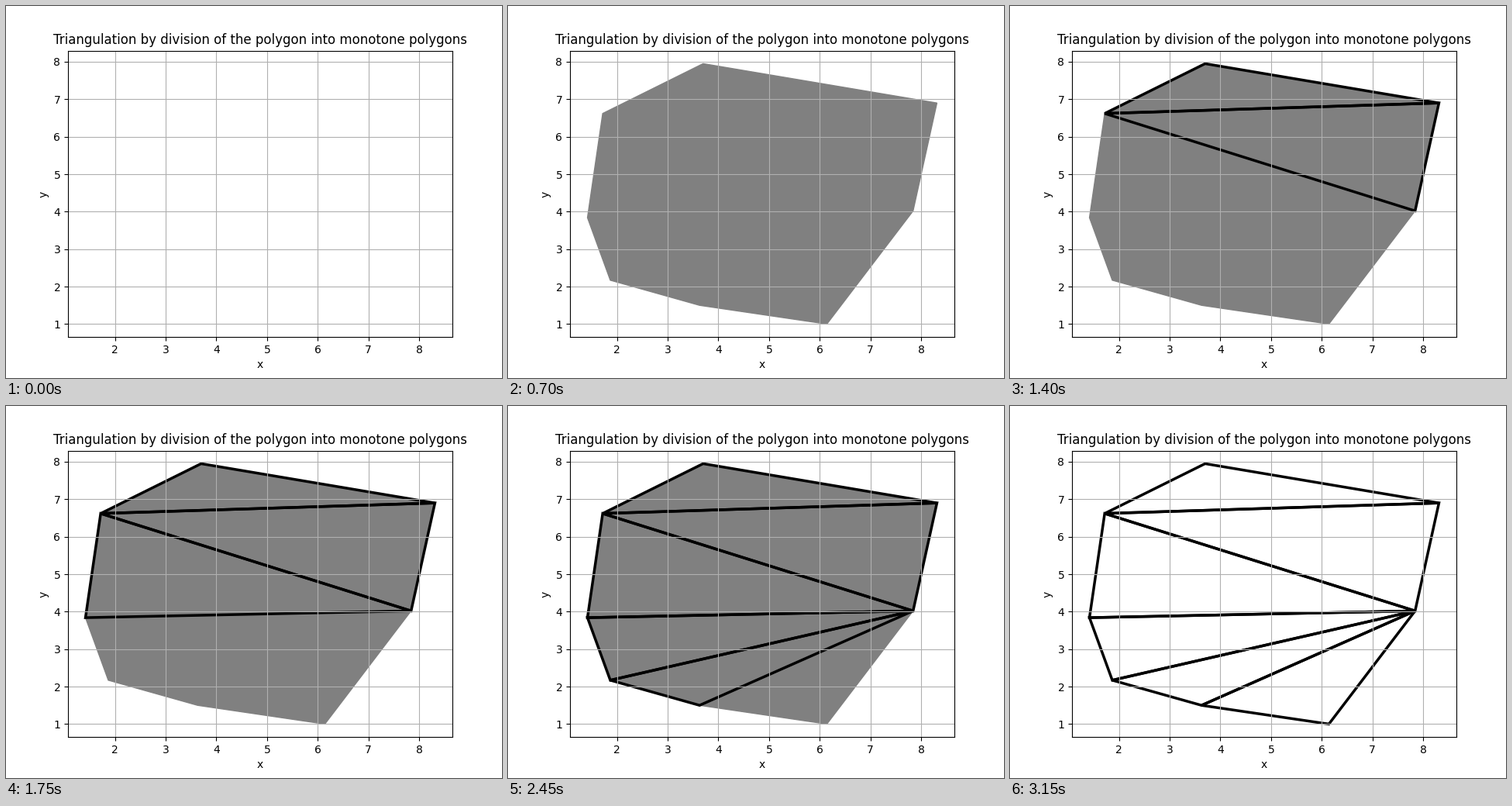
Recreate the animation shown at these times as a matplotlib script. Size 640x480 px, loop 3.5 s.

```python
import matplotlib.pyplot as plt
from matplotlib.animation import ArtistAnimation
from matplotlib.patches import Polygon

STEP_MS = 350

# Vertices, clockwise from the top
TOP, RIGHT, ELBOW = (3.7, 7.95), (8.31, 6.9), (7.84, 4.02)
BOTTOM, LOW, HEEL = (6.14, 1.0), (3.63, 1.5), (1.87, 2.17)
LEFT, SHOULDER = (1.42, 3.84), (1.72, 6.62)
OUTLINE = [TOP, RIGHT, ELBOW, BOTTOM, LOW, HEEL, LEFT, SHOULDER]

# Triangles in the order the sweep cuts them off
TRIANGLES = [
    (TOP, RIGHT, SHOULDER),
    (SHOULDER, RIGHT, ELBOW),
    (SHOULDER, ELBOW, LEFT),
    (LEFT, ELBOW, HEEL),
    (HEEL, ELBOW, LOW),
    (LOW, ELBOW, BOTTOM),
]

fig, ax = plt.subplots(figsize=(6.4, 4.8), dpi=100)
ax.set_title("Triangulation by division of the polygon into monotone polygons")
ax.set_xlabel("x")
ax.set_ylabel("y")
ax.grid(True)


def add_polygon(points, **style):
    return ax.add_patch(Polygon(points, closed=True, **style))


border = add_polygon(OUTLINE, fill=False, edgecolor="black", linewidth=1)
body = add_polygon(OUTLINE, color="gray", linewidth=1)
cuts = [add_polygon(t, fill=False, edgecolor="black", linewidth=2.5)
        for t in TRIANGLES]
ax.autoscale_view()

scenes = [[], [border]]
scenes += [[body] + cuts[:n] for n in range(len(cuts) + 1)]
scenes += [cuts]

anim = ArtistAnimation(fig, scenes, interval=STEP_MS, repeat=True, repeat_delay=0)
plt.show()
```
